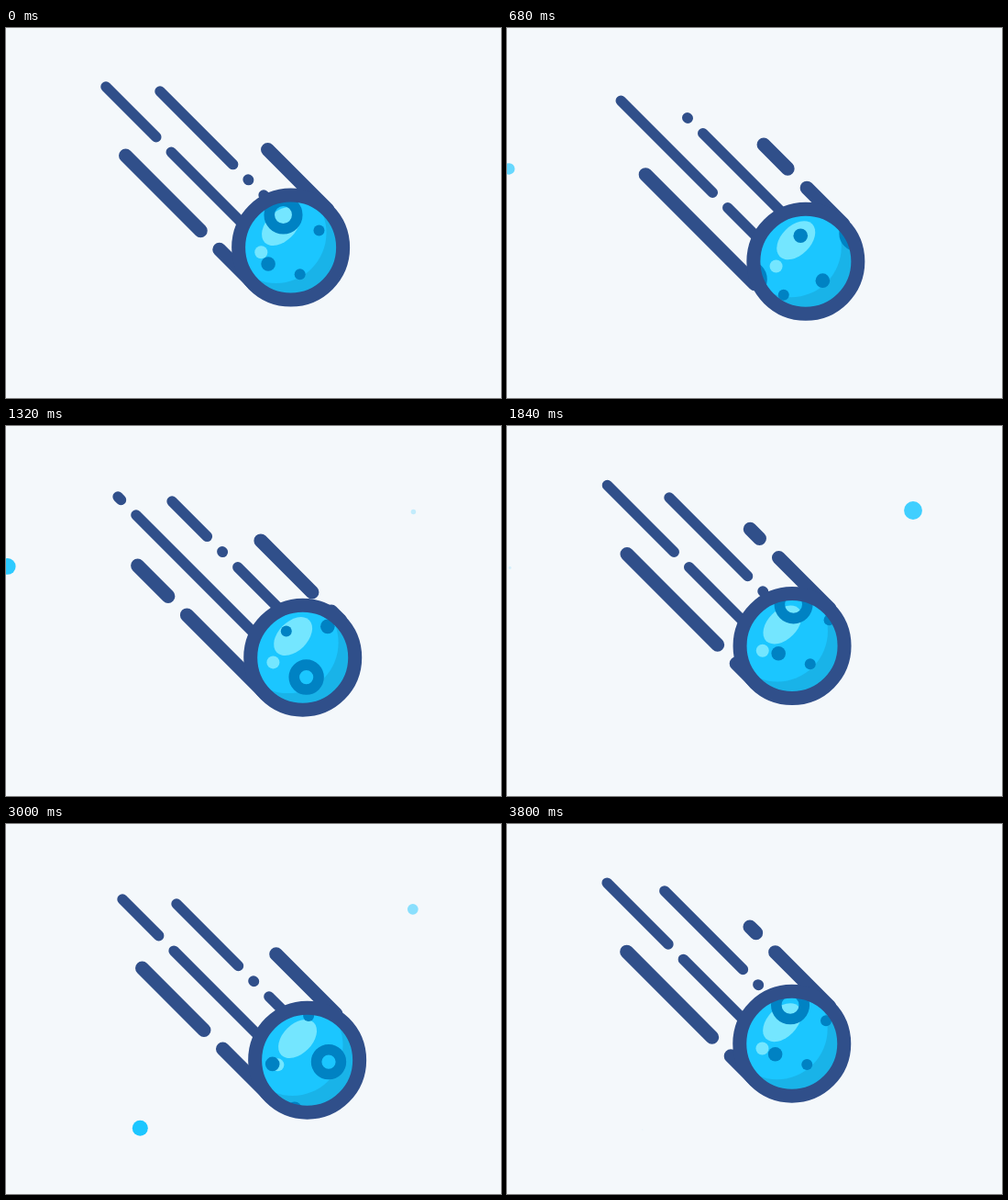
Animation, 540 px wide and 403 px high, one loop 3.84 s. Source, as an HTML page with a canvas:

```html
<!DOCTYPE html>
<html lang="en">
<head>
<meta charset="utf-8">
<title>Comet</title>
<style>
  html, body { margin: 0; width: 100%; height: 100%; overflow: hidden; background: #f4f8fb; }
  canvas { display: block; }
</style>
</head>
<body>
<canvas id="stage" width="540" height="403"></canvas>
<script>
const ctx = document.getElementById('stage').getContext('2d');
const LOOP = 3840, CYCLE = 1920, TAU = Math.PI * 2;
const NAVY = '#304f8a', CYAN = '#1bc6ff', SHADE = '#19b3e8', CRATER = '#0082c3', SHINE = '#74e6ff';
const CX = 310.6, CY = 239.1;

// Each trail runs at 45 degrees (y = x - k); all lengths are measured along x.
// end: x where a dash ends at phase 0
const trails = [
  { k: 45,   from: 109,   to: 259,   width: 11.5, end: 167,   dash: [131.5, 16.5] },
  { k: 99,   from: 168,   to: 286,   width: 11.5, end: 250.2, dash: [85.5, 16.5, 0.5, 16.5] },
  { k: -8.5, from: 130.5, to: 270.5, width: 15,   end: 215.3, dash: [119, 20.5] },
  { k: 153,  from: 264.8, to: 351.6, width: 15,   end: 266.4, dash: [65.3, 21] },
];

// Craters slide down-left along x + y = sum.
const SPAN = 158.4;
const craters = [
  { sum: 506, x: 304.2, r: 15.25, ring: true },
  { sum: 575, x: 423,   r: 13.4, ring: true },
  { sum: 543, x: 287.8, r: 7.8 },
  { sum: 516, x: 361.7, r: 7.8 },
  { sum: 589, x: 385.8, r: 7.8 },
  { sum: 589, x: 322.4, r: 6 },
  { sum: 562, x: 343.2, r: 6 },
  { sum: 503, x: 401.1, r: 6 },
];

const sparks = [
  { x: 3.5, y: 154.7, r: 9.6,  start: 320,  end: 1920 },
  { x: 445, y: 94,    r: 12,   start: 1160, end: 3360 },
  { x: 148, y: 333,   r: 8.5,  start: 2080, end: 3840 },
];

const mod = (a, n) => ((a % n) + n) % n;

function disc(x, y, r, color) {
  ctx.fillStyle = color;
  ctx.beginPath();
  ctx.arc(x, y, r, 0, TAU);
  ctx.fill();
}

function ring(x, y, r, width, color) {
  ctx.strokeStyle = color;
  ctx.lineWidth = width;
  ctx.beginPath();
  ctx.arc(x, y, r, 0, TAU);
  ctx.stroke();
}

function drawSpark({ x, y, r, start, end }, t) {
  if (t <= start || t >= end) return;
  const grow = Math.sin(Math.PI * (t - start) / (end - start));
  const shift = 0.2 * r * grow;
  ctx.globalAlpha = grow;
  disc(x - shift, y - shift, r * grow, CYAN);
  ctx.globalAlpha = 1;
}

function drawTrail({ k, from, to, width, end, dash }, phase) {
  const period = dash.reduce((a, b) => a + b);
  const dashEnd = end - period * phase / 960;
  ctx.strokeStyle = NAVY;
  ctx.lineWidth = width;
  ctx.lineCap = 'round';
  ctx.setLineDash(dash.map(d => d * Math.SQRT2));
  ctx.lineDashOffset = mod(from - dashEnd + dash[0], period) * Math.SQRT2;
  ctx.beginPath();
  ctx.moveTo(from, from - k);
  ctx.lineTo(to, to - k);
  ctx.stroke();
  ctx.setLineDash([]);
}

function drawCrater({ sum, x, r, ring: hollow }, phase) {
  const left = (sum + CX - CY - SPAN) / 2;
  const cx = left + mod(x - left - SPAN * phase / CYCLE, SPAN);
  if (hollow) ring(cx, sum - cx, r, 11.6, CRATER);
  else disc(cx, sum - cx, r, CRATER);
}

function drawBall(phase) {
  ctx.save();
  ctx.beginPath();
  ctx.arc(CX, CY, 53, 0, TAU);
  ctx.clip();
  disc(CX, CY, 54, SHADE);
  disc(294.5, 223, 55, CYAN);
  ctx.fillStyle = SHINE;
  ctx.beginPath();
  ctx.ellipse(300, 216, 25, 16, -Math.PI / 4, 0, TAU);
  ctx.fill();
  disc(278.3, 244.3, 7, SHINE);
  craters.forEach(c => drawCrater(c, phase));
  ctx.restore();
  ring(CX, CY, 57, 15, NAVY);
}

function draw(t) {
  const phase = 20 + (t % CYCLE) * 0.98;
  const sway = 9.375 * (1 - Math.cos(TAU * phase / CYCLE));
  ctx.fillStyle = '#f4f8fb';
  ctx.fillRect(0, 0, 540, 403);
  sparks.forEach(s => drawSpark(s, t));
  ctx.save();
  ctx.translate(sway, sway);
  trails.forEach(trail => drawTrail(trail, phase));
  drawBall(phase);
  ctx.restore();
}

const began = performance.now();
function tick() {
  draw((performance.now() - began) % LOOP);
  requestAnimationFrame(tick);
}
tick();
</script>
</body>
</html>
```
